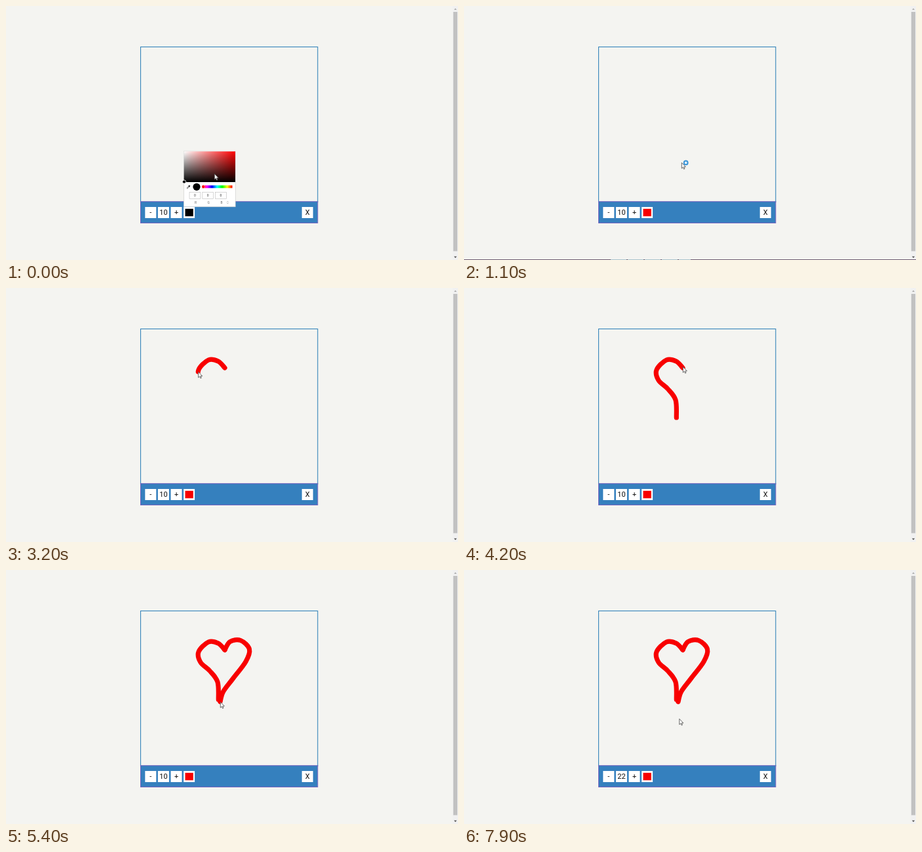
Recreate the animation shown at these times as an HTML page. Size 690 by 388 pixels, loop 8 s.

```html
<!DOCTYPE html>
<html lang="en">
<head>
<meta charset="utf-8">
<title>Drawing pad</title>
<style>
  html, body { margin: 0; width: 100%; height: 100%; overflow: hidden; background: #f4f4f1; }
  svg { display: block; width: 100vw; height: 100vh; }
  text { font-family: Roboto, Arial, sans-serif; font-size: 11px; text-anchor: middle; fill: #111; }
  .small text { font-size: 5px; fill: #333; }
  .stroke { fill: none; stroke: #f80000; stroke-width: 7.2; stroke-linecap: round; stroke-linejoin: round; }
</style>
</head>
<body>
<svg viewBox="0 0 690 388">
  <defs>
    <linearGradient id="sat"><stop stop-color="#fff"/><stop offset="1" stop-color="#f00"/></linearGradient>
    <linearGradient id="dark" x2="0" y2="1"><stop stop-color="#000" stop-opacity="0"/><stop offset="1"/></linearGradient>
    <linearGradient id="hue"></linearGradient>
  </defs>

  <rect width="690" height="388" fill="#f4f4f1"/>
  <rect x="205.5" y="62.5" width="270.3" height="237" fill="none" stroke="#3584b9" stroke-width="1.1"/>
  <rect x="205.5" y="298.8" width="270.3" height="32.6" fill="#3580be" stroke="#6c5cbc"/>

  <g id="buttons"></g>
  <rect id="swatch" x="273.5" y="309.8" width="12.3" height="11.4"/>

  <g id="scrollbar">
    <rect x="682" width="8" height="388" fill="#f1f1f1"/>
    <rect x="682.8" y="9" width="6.2" height="365.5" fill="#c1c1c1"/>
    <path d="M684 5.8L686 3.6L688 5.8Z" fill="#a3a3a3"/>
    <path d="M683.8 382.6H688.2L686 385Z" fill="#505050"/>
  </g>

  <g id="taskbar">
    <rect y="387" width="690" height="1" fill="#6d5a70"/>
    <path d="M224 387.5H346" stroke="#a9c3cc" stroke-dasharray="24 2"/>
  </g>

  <g id="picker" class="small">
    <rect x="271.3" y="222" width="78.9" height="84.8" fill="#fff" stroke="#c8c8c8" stroke-width=".6"/>
    <rect x="271.6" y="222.2" width="78.4" height="46.8" fill="url(#sat)"/>
    <rect x="271.6" y="222.2" width="78.4" height="46.8" fill="url(#dark)"/>
    <circle id="knob" r="2.6" stroke="#fff" stroke-width=".9"/>
    <path d="M276.4 278.6l.5-1.5 2.2-2.2 1 1-2.2 2.2z" fill="#fff" stroke="#333" stroke-width=".7"/>
    <path d="M278.7 274.5l1.8 1.8M279.8 275.2l1-1" stroke="#222" stroke-width="1.5"/>
    <circle id="dot" cx="291" cy="276.3" r="5.6"/>
    <rect x="299" y="274" width="46.5" height="4.2" fill="url(#hue)"/>
    <circle cx="301.3" cy="276.1" r="2.5" fill="#f00" stroke="#fff" stroke-width=".5"/>
    <g id="channels"></g>
    <path d="M337.2 299.7l1.2-1.3 1.2 1.3M337.2 300.8l1.2 1.3 1.2-1.3" fill="none" stroke="#777" stroke-width=".5"/>
  </g>

  <path id="left" class="stroke"/>
  <path id="right" class="stroke"/>

  <g id="cursor">
    <path id="arrow" d="M.3.4V9.1L2.3 7.3 3.6 10.2 5 9.6 3.7 6.8H6.4Z" fill="#fff" stroke="#444" stroke-width=".8" stroke-linejoin="round"/>
    <circle id="busy" cx="6.7" cy=".4" r="2.9" fill="#e2f3fb" stroke="#3a93d6" stroke-width="2"/>
    <path id="hand" d="M2 6.7V1.4Q2-.1 2.9-.1T3.8 1.4V4.2Q5 3.7 5.2 4.7 6.3 4.2 6.5 5.2 7.7 4.9 7.7 6V8.6L6.7 11.4H2.7L.4 7.8Q-.4 6.3.6 6T2 6.7Z" fill="#fff" stroke="#222" stroke-width=".8" stroke-linejoin="round"/>
  </g>
</svg>
<script>
const LOOP = 8000, STEP = 100;
const PICK = 400, CLOSE = 1100, SETTLE = 1500;
const $ = id => document.getElementById(id);
const clamp = v => Math.max(0, Math.min(1, v));
const mix = (a, b, k) => a + (b - a) * k;
const ease = k => k * k * (3 - 2 * k);
const show = (id, on) => $(id).setAttribute('visibility', on ? 'visible' : 'hidden');

// Smooth curve through a few points
function spline(points) {
  const at = i => points[Math.max(0, Math.min(points.length - 1, i))];
  let d = `M${points[0]}`;
  for (let i = 1; i < points.length; i++) {
    const [p, a, b, n] = [at(i - 2), at(i - 1), at(i), at(i + 1)];
    const c1 = a.map((v, j) => v + (b[j] - p[j]) / 6);
    const c2 = b.map((v, j) => v - (n[j] - a[j]) / 6);
    d += `C${c1} ${c2} ${b}`;
  }
  return d;
}

$('left').setAttribute('d', spline([
  [334, 122], [324, 112], [309, 110], [294, 125], [297, 141], [311, 154], [323, 171], [324.3, 198]]));
$('right').setAttribute('d', spline([
  [334, 122], [342, 109.5], [358, 107.5], [371.5, 121], [366, 140], [346, 166.5], [331.5, 186], [327, 201.2]]));

// Cursor moves: start, end, then a point to reach or a stroke to draw
const moves = [
  [0, PICK, [349, 222]], [PICK, 800, [332, 239]],
  [CLOSE, 1900, [317, 135]], [2000, 2100, [314, 147]], [2100, 2600, [334.5, 122]],
  [2800, 3800, 'left'], [3800, 4200, [334, 120]], [4300, 5400, 'right'],
  [5500, 6000, [252, 318]], [7500, 7600, [328.5, 227]]
];

function drawStroke(id, share) {
  const path = $(id), length = path.getTotalLength();
  path.setAttribute('stroke-dasharray', `${length * share} ${length * 2}`);
  show(id, share > 0);
  const { x, y } = path.getPointAtLength(length * share);
  return [x, y];
}

function moveCursor(t) {
  let tip = [318, 256];
  for (const [from, to, goal] of moves) {
    const k = clamp((t - from) / (to - from));
    if (typeof goal === 'string') {
      const end = drawStroke(goal, k);
      if (k > 0) tip = end;
    } else {
      tip = tip.map((v, i) => mix(v, goal[i], ease(k)));
    }
  }
  return tip;
}

// Steady clicking on the plus button
const brushSize = t => 10 + Math.max(0, Math.min(12, Math.floor((t - 5845) / 137)));

const button = (x, label, id = '') =>
  `<rect x="${x}" y="307" width="17" height="17" fill="#fff"/>` +
  `<text id="${id}" x="${x + 8.5}" y="319.4">${label}</text>`;
$('buttons').innerHTML = ['-', '10', '+', ''].map((label, i) =>
  button(212.3 + i * 19.6, label, i === 1 ? 'size' : '')).join('') + button(451.7, 'X');

$('hue').innerHTML = Array.from({ length: 7 }, (_, i) =>
  `<stop offset="${i / 6}" stop-color="hsl(${360 - i * 60} 100% 50%)"/>`).join('');

$('channels').innerHTML = ['R', 'G', 'B'].map((name, i) => {
  const x = 280 + i * 19.8;
  return `<rect x="${x}" y="284.3" width="16.8" height="10.4" fill="#fff" stroke="#bbb" stroke-width=".6"/>` +
    `<text id="value${name}" x="${x + 8.4}" y="291.3">0</text>` +
    `<text x="${x + 9.5}" y="301.8" style="fill:#666">${name}</text>`;
}).join('');

function draw(t) {
  const red = t >= PICK;
  for (const id of ['swatch', 'dot', 'knob']) $(id).setAttribute('fill', red ? '#f80000' : '#000');
  $('knob').setAttribute('cx', red ? 349 : 272);
  $('knob').setAttribute('cy', red ? 222.5 : 268.5);
  $('valueR').textContent = red ? 255 : 0;
  $('size').textContent = brushSize(t);

  const tip = moveCursor(t), overButton = tip[1] > 307;
  $('cursor').setAttribute('transform', `translate(${tip})`);
  const waiting = t >= CLOSE && t < SETTLE;
  show('picker', t < CLOSE);
  show('taskbar', waiting);
  show('busy', waiting);
  show('arrow', !overButton);
  show('hand', overButton);
}

const start = performance.now();
function tick() {
  const t = (performance.now() - start) % LOOP;
  draw(Math.floor(t / STEP) * STEP);
  requestAnimationFrame(tick);
}
draw(0);
requestAnimationFrame(tick);
</script>
</body>
</html>
```
